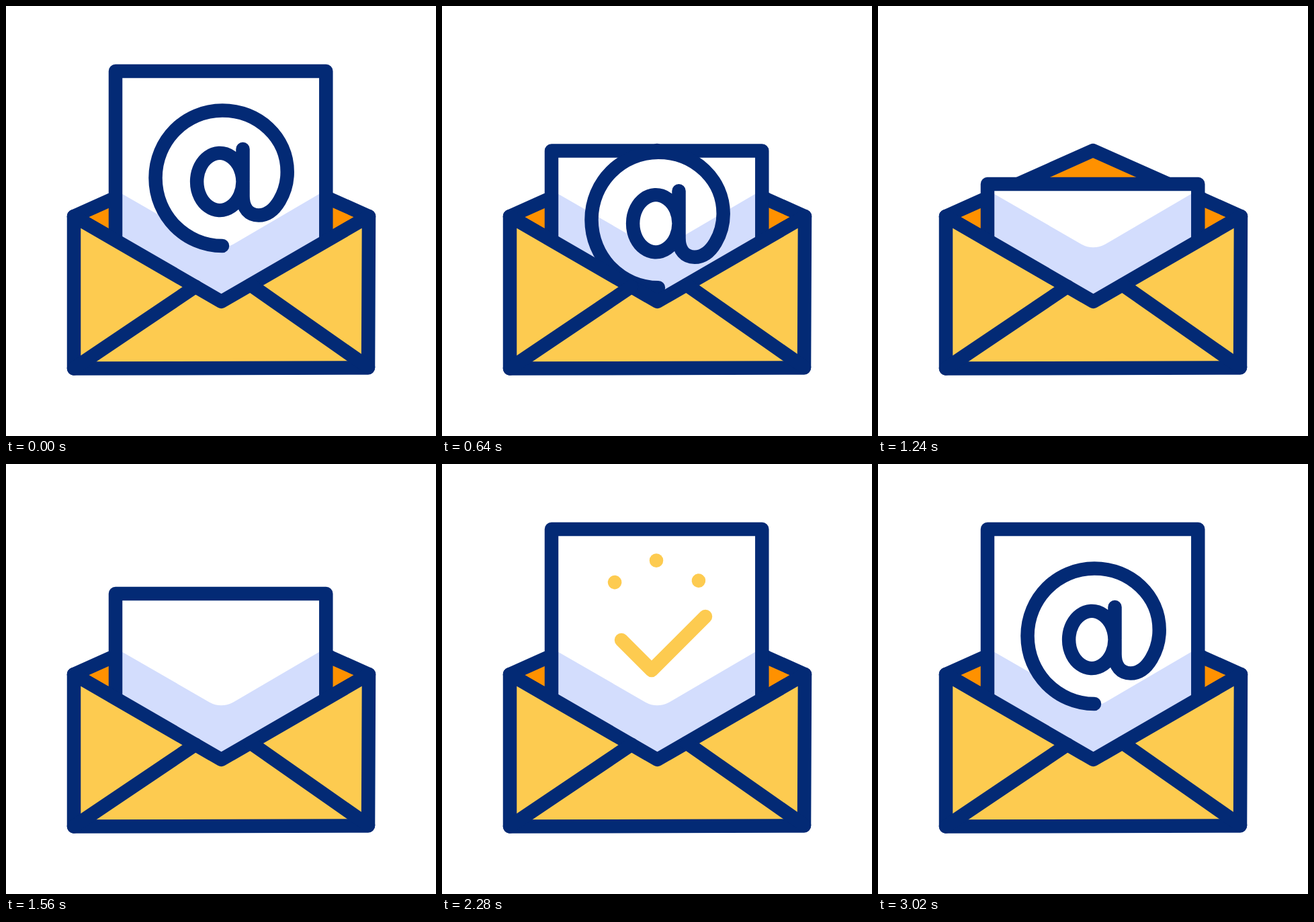
Write an HTML page that moves like this. It is 640 by 640 pixels and loops after 3.6 s.

```html
<!DOCTYPE html>
<html lang="en">
<head>
<meta charset="utf-8">
<title>Envelope</title>
<style>
  html, body { margin: 0; width: 100%; height: 100%; overflow: hidden; background: #fff; }
  svg { display: block; width: 100vw; height: 100vh; }
  .line { fill: none; stroke: #032a75; stroke-width: 20.5; stroke-linecap: round; stroke-linejoin: round; }
  .gold { stroke: #fdcb50; stroke-width: 20.5; }
</style>
</head>
<body>
<svg viewBox="0 0 640 640">
  <defs>
    <clipPath id="pocket"><path d="M0 0H640V313H540L320.5 440L101 313H0Z"/></clipPath>
    <clipPath id="sheet"><rect id="sheetArea" x="163" width="313" height="500"/></clipPath>
  </defs>

  <path class="line" style="fill:#ff9100" d="M101 313L320 215L540 313L320.5 440Z"/>

  <g clip-path="url(#pocket)">
    <path id="paper" fill="#fff"/>
    <path clip-path="url(#sheet)" fill="#d3ddfd"
      d="M163 274L303 354.7Q320 364 338 354.7L476 274V440H163Z"/>
    <path id="paperEdge" class="line"/>
    <path id="at" class="line" pathLength="1"
      d="M322 357C267 357 222.5 312 222.5 256C222.5 200 267 155.5 322 155.5
         C376 155.5 418.7 196 418.7 247C418.7 275 402 311.5 376 311.5
         C362 311.5 352.5 302 352.5 283V262
         A34.2 42.5 0 1 1 352.5 261V213"/>
    <path class="line gold check" pathLength="1" d="M392 227L312 307L267 262"/>
    <path class="line gold ray" pathLength="1" d="M257 176L274 198"/>
    <path class="line gold ray" pathLength="1" d="M319 143.5V171"/>
    <path class="line gold ray" pathLength="1" d="M382 173.500L365 195.500"/>
  </g>

  <path class="line" style="fill:#fdcb50" d="M101 313V539.500L539 538.500L540 313L320.500 440Z"/>
  <path class="line" d="M101 539.500L282 417.500M539 537.500L364 415"/>
</svg>

<script>
const LOOP = 3600;
const DROP = 168;
const AT_DROP = 300;

const find = selector => document.querySelector(selector);
const paper = find('#paper');
const paperEdge = find('#paperEdge');
const sheetArea = find('#sheetArea');
const at = find('#at');
const check = find('.check');
const rays = document.querySelectorAll('.ray');

const span = (t, from, to) => Math.min(1, Math.max(0, (t - from) / (to - from)));

// Symmetric cubic-bezier(a, 0, 1 - a, 1), solved by bisection.
function ease(u, a = 2 / 3) {
  let low = 0, high = 1;
  for (let i = 0; i < 24; i++) {
    const s = (low + high) / 2, r = 1 - s;
    const x = 3 * a * s * r * r + 3 * (1 - a) * s * s * r + s * s * s;
    if (x < u) low = s; else high = s;
  }
  return u <= 0 ? 0 : u >= 1 ? 1 : low * low * (3 - 2 * low);
}

function trim(path, amount) {
  path.style.display = amount > 0 ? '' : 'none';
  path.setAttribute('stroke-dasharray', amount < 1 ? `${amount} 2` : 'none');
}

function render(t) {
  const sunk = ease(span(t, 300, 920), 0.8) - ease(span(t, 1260, 1880), 0.8);
  const top = 97 + DROP * sunk;
  const outline = `M163 450V${top}H476.3V450`;
  paper.setAttribute('d', outline);
  paperEdge.setAttribute('d', outline);
  sheetArea.setAttribute('y', top);

  const redrawn = t >= 2690;
  at.setAttribute('transform', `translate(0 ${redrawn ? 0 : AT_DROP * ease(span(t, 300, 1200))})`);
  trim(at, redrawn ? span(t, 2690, 3020) : t < 1200 ? 1 : 0);

  const leave = 1 - ease(span(t, 2500, 2660));
  trim(check, ease(span(t, 1880, 2275)) * leave);
  rays.forEach(ray => trim(ray, ease(span(t, 2260, 2500)) * leave));
}

const start = performance.now();
function tick() {
  render((performance.now() - start) % LOOP);
  requestAnimationFrame(tick);
}
tick();
</script>
</body>
</html>
```
